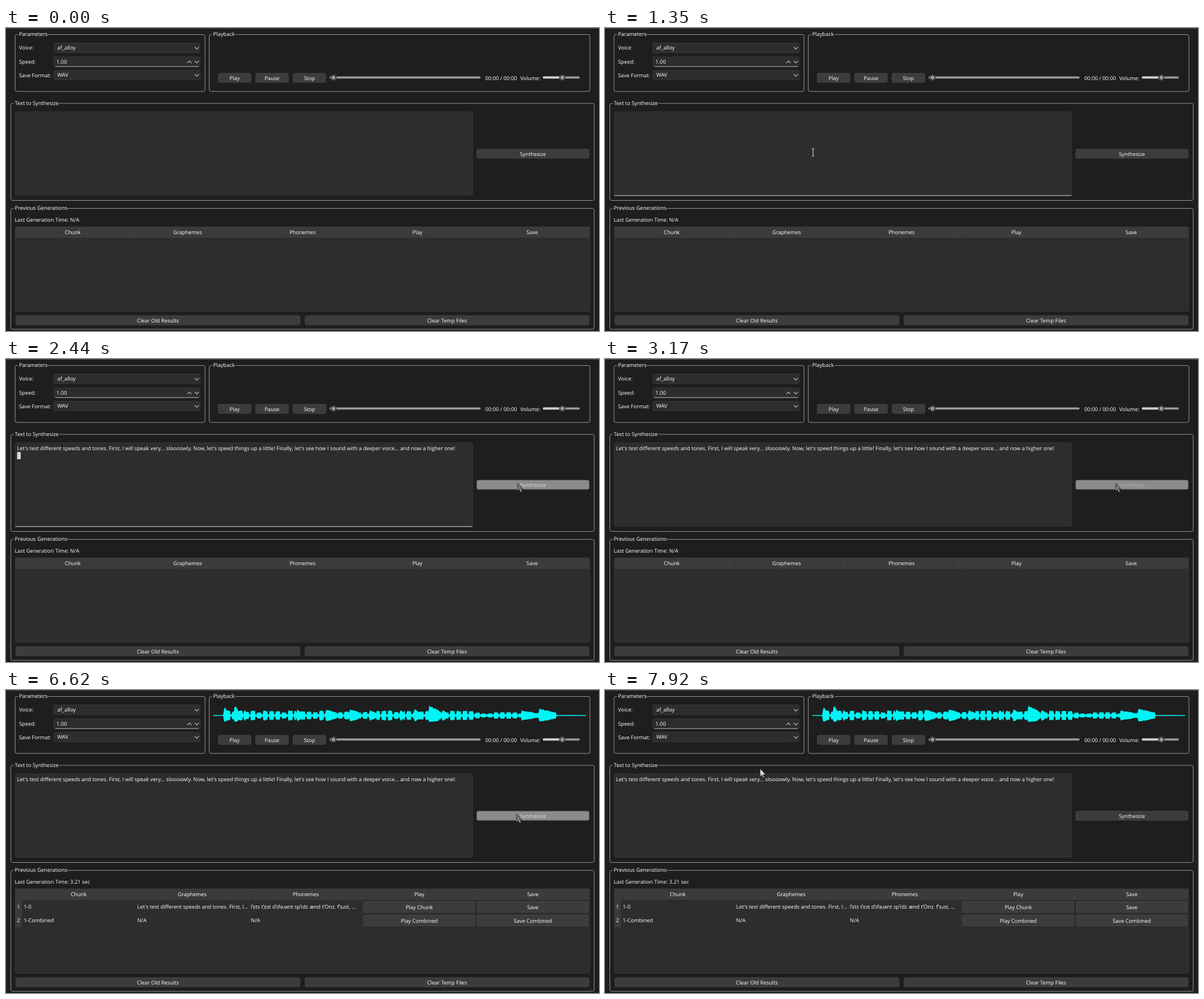
An HTML page that plays this animation: 1046 by 535 pixels, repeating every 7.99 s.

```html
<!DOCTYPE html>
<html lang="en">
<head>
<meta charset="utf-8">
<title>Speech synthesis window</title>
<style>
  html, body { margin: 0; width: 100%; height: 100%; overflow: hidden; background: #1e1e1e; }
  svg { display: block; width: 100vw; height: 100vh; }
  text { font: 9.32px "Open Sans", "Noto Sans", sans-serif; fill: #fff; text-rendering: geometricPrecision; white-space: pre; }
  .mid { text-anchor: middle; }
  .frame { fill: none; stroke: #989898; }
  .field { fill: #2d2d2d; stroke: #383838; }
  .button rect { fill: #3c3c3c; stroke: #464646; }
  .button.hover rect { fill: #8b8b8b; stroke: #707070; }
  .button.hover text { fill: #dcdcdc; }
  .button.off text { fill: #b4b4b4; }
  .head { fill: #3b3b3b; }
  .grid { stroke: #484848; stroke-width: .8; }
  .faint { stroke: #343434; }
  .chevron { fill: none; stroke: #d8d8d8; stroke-width: 1.1; }
  .focus { fill: #a3a3a3; }
  #pointer { mix-blend-mode: difference; }
</style>
</head>
<body>
<svg id="stage" viewBox="0 0 1046 535" preserveAspectRatio="none" xmlns="http://www.w3.org/2000/svg"></svg>
<script>
const LOOP = 7990, FRAME = 70;
const LINE = "Let's test different speeds and tones. First, I will speak very... sloooowly. " +
  "Now, let's speed things up a little! Finally, let's see how I sound with a deeper voice... and now a higher one!";
const COLUMNS = ["Chunk", "Graphemes", "Phonemes", "Play", "Save"];

const rect = (x, y, r, b, cls, round = 0) =>
  `<rect x="${x}" y="${y}" width="${r - x}" height="${b - y}" rx="${round}" class="${cls}"/>`;
const fill = (x, y, r, b, color, round = 0) =>
  `<rect x="${x}" y="${y}" width="${r - x}" height="${b - y}" rx="${round}" fill="${color}"/>`;
const text = (x, cy, s, cls = "") => `<text x="${x}" y="${cy + 3.3}" class="${cls}">${s}</text>`;
const divider = (x, top, bottom, cls) => `<line x1="${x}" y1="${top}" x2="${x}" y2="${bottom}" class="${cls}"/>`;
const group = (id, content) => `<g id="${id}">${content}</g>`;

const button = (x, y, r, b, label, id = "") =>
  `<g class="button" id="${id}">${rect(x + .5, y + .5, r - .5, b - .5, "", 2.5)}` +
  text((x + r) / 2, (y + b) / 2 + .3, label, "mid") + "</g>";

const box = (x, y, r, b, title, titleX, gapEnd) =>
  rect(x, y, r, b, "frame", 3) + fill(titleX - 2, y - 1, gapEnd, y + 1, "#1e1e1e") + text(titleX, y - .5, title);

const chevron = (x, y, dir = 1) =>
  `<path class="chevron" d="M${x - 3.6} ${y - 1.8 * dir}l3.6 ${3.6 * dir}l3.6 ${-3.6 * dir}"/>`;

const field = (y, value, x) => rect(84.5, y + .5, 342.5, y + 17.5, "field", 2.5) +
  text(x, y + 9, value) + chevron(336.5, y + 9.5);

const slider = (x, r, at) => fill(x, 85.6, r, 89.2, "#9a9a9a", 1.5) + fill(x, 85.6, at, 89.2, "#cfcfcf", 1.5) +
  `<circle cx="${at}" cy="87.5" r="5.6" fill="#454545"/><circle cx="${at}" cy="87.5" r="3" fill="#a0a0a0"/>`;

function header(x0) {
  const w = (1029.5 - x0) / COLUMNS.length;
  return rect(16.5, 351, 1029.5, 370.5, "head") + COLUMNS.map((name, i) =>
    (i ? divider(x0 + i * w, 351, 370.5, "grid") : "") + text(x0 + (i + .5) * w, 361, name, "mid")).join("");
}

function row(n, y, cells, play, save) {
  return rect(16.5, y, 28, y + 24, "head") + text(22, y + 12, n, "mid") +
    cells.map((s, i) => text(31.3 + 200.3 * i, y + 11.7, s) +
      divider(228.3 + 200.3 * i, y, y + 24, "faint")).join("") +
    button(630.5, y + 2, 827.5, y + 22, play) + button(831, y + 2, 1027.5, y + 22, save);
}

// Stressed syllables: start, peak, length. Seeded quiet syllables fill the rest.
const STRESSED = [
  [384, 19, 6], [402, 21, 8], [419, 12, 6], [512, 12, 9], [563, 11, 22], [605, 11, 22], [640, 10, 14],
  [694, 11, 8], [719, 13, 11], [745, 19, 20], [768, 10, 12], [908, 9, 30], [939, 12, 32]
];

function waveform() {
  let seed = 7, quiet = 0, top = "", bottom = "";
  const random = () => (seed = seed * 16807 % 2147483647) / 2147483647;
  for (let x = 366; x <= 1023; x++) {
    const beat = (x - 366) % 11;
    if (!beat) quiet = (x < 820 ? 5 : 3) + 3.5 * random();
    const hit = STRESSED.find(([start, , length]) => x >= start && x < start + length);
    let a = beat < 8 ? quiet : 2;
    if (x < 384 || x > 970) a = .8;
    if (hit) a = hit[1] * Math.min(1, (x - hit[0] + 1) / 3) * (1 - .6 * (x - hit[0]) / hit[2]);
    a *= .9 + .2 * random();
    const down = a > 10 ? 10 + (a - 10) * .2 : a;
    top += `L${x} ${(45 - a).toFixed(1)}`;
    bottom = `L${x} ${(45 + down).toFixed(1)}` + bottom;
  }
  return `<path fill="#00f5f5" d="M365.5 45${top}${bottom}Z"/>`;
}

const ARROW = "M0 0V14L3.2 11L5.6 16L7.5 15.1L5.3 10.3H9.6Z";
const BEAM = "M-2.2 -6.5H2.2M-2.2 6.5H2.2M0 -6.5V6.5";

document.getElementById("stage").innerHTML =
  fill(0, 0, 1046, 535, "#1e1e1e") + fill(0, 0, 1046, 1, "#555") +
  box(16, 11.5, 351, 112, "Parameters", 23, 73) +
  text(23, 35, "Voice:") + field(26, "af_alloy", 90.5) +
  text(23, 59.5, "Speed:") + field(50.5, "1.00", 89) + chevron(323.5, 60, -1) + rect(87, 67.5, 340, 68.7, "focus") +
  text(23, 83.5, "Save Format:") + field(74, "WAV", 90.5) +
  box(358.5, 11.5, 1030, 112, "Playback", 365.5, 405) + group("wave", waveform()) +
  ["Play", "Pause", "Stop"].map((s, i) => button(374 + 66 * i, 79.5, 432.5 + 66 * i, 96.5, s)).join("") +
  slider(571, 837, 577.7) + text(845.5, 88.5, "00:00 / 00:00") +
  text(907, 88.5, "Volume:") + slider(947, 1012, 981.3) +
  box(8.5, 133, 1037.5, 304.5, "Text to Synthesize", 15.5, 94) +
  rect(16.5, 148, 823, 295, "field", 2.5) + group("focus", rect(16, 295.2, 823, 296.6, "focus")) +
  group("typed", text(19.5, 157.5, LINE)) +
  '<rect id="caret" x="19.5" width="6.5" height="12.8" fill="#d6d6d6"/>' +
  button(830, 213.5, 1029, 230.5, "Synthesize", "synth") +
  box(8.5, 318.5, 1037.5, 532, "Previous Generations", 15.5, 108) +
  rect(16.5, 351, 1029.5, 500, "field", 1.5) +
  group("before", text(15.5, 339, "Last Generation Time: N/A") + header(16.5)) +
  group("after", text(15.5, 339, "Last Generation Time: 3.21 sec") + header(28) +
    row(1, 371, ["1-0", "Let's test different speeds and tones. First, I...",
      "lˈɛts tˈɛst dˈɪfəɹənt spˈidz ænd tˈOnz. fˈɜɹst, ..."], "Play Chunk", "Save") +
    row(2, 395, ["1-Combined", "N/A", "N/A"], "Play Combined", "Save Combined")) +
  button(17, 507.5, 519, 524.5, "Clear Old Results") +
  button(527, 507.5, 1029, 524.5, "Clear Temp Files", "clearTemp") +
  `<g id="pointer"><path id="arrow" d="${ARROW}" fill="#fff"/>` +
  `<path id="beam" d="${BEAM}" fill="none" stroke="#fff" stroke-width="1.1"/></g>` +
  `<path id="edge" d="${ARROW}" fill="none" stroke="#1a1a1a" stroke-width=".7"/>`;

const $ = id => document.getElementById(id);
const show = (id, on) => $(id).style.display = on ? "" : "none";
const ease = p => p * p * (3 - 2 * p);

// Pointer moves: first and last change, end point.
const MOVES = [
  [250, 250, 715.7, 380], [320, 800, 367, 219.5], [1880, 2440, 902.5, 219],
  [3170, 3170, 900.7, 219], [7360, 7920, 273.7, 139]
];

function pointerAt(t) {
  let x = 760, y = 512;
  for (const [start, end, tx, ty] of MOVES) {
    if (t < start) break;
    const steps = Math.round((end - start) / FRAME) + 1;
    const p = ease(Math.min(1, (Math.floor((t - start) / FRAME) + 1) / steps));
    x += (tx - x) * p;
    y += (ty - y) * p;
  }
  return [x, y];
}

function draw(t) {
  const [x, y] = pointerAt(t), visible = t >= 190;
  const inside = (l, top, r, b) => visible && x > l && x < r && y > top && y < b;
  const overText = inside(16, 148, 823, 296), done = t >= 6620;

  for (const id of ["pointer", "edge"]) $(id).setAttribute("transform", `translate(${x} ${y})`);
  show("pointer", visible);
  show("arrow", !overText);
  show("edge", visible && !overText);
  show("beam", overText);

  show("focus", t >= 870 && t < 3170);
  show("typed", t >= 1480);
  show("caret", t >= 870 && t < 1350 || t >= 1480 && t < 1880 || t >= 2440 && t < 2970);
  $("caret").setAttribute("y", t < 1480 ? 151.3 : 164.2);

  $("synth").classList.toggle("hover", inside(830, 213, 1029, 231));
  $("synth").classList.toggle("off", t >= 3170 && !done);
  $("clearTemp").classList.toggle("hover", inside(527, 507, 1029, 525));

  for (const id of ["wave", "after"]) show(id, done);
  show("before", !done);
}

const began = performance.now();
function tick() {
  draw((performance.now() - began) % LOOP);
  requestAnimationFrame(tick);
}
tick();
</script>
</body>
</html>
```
